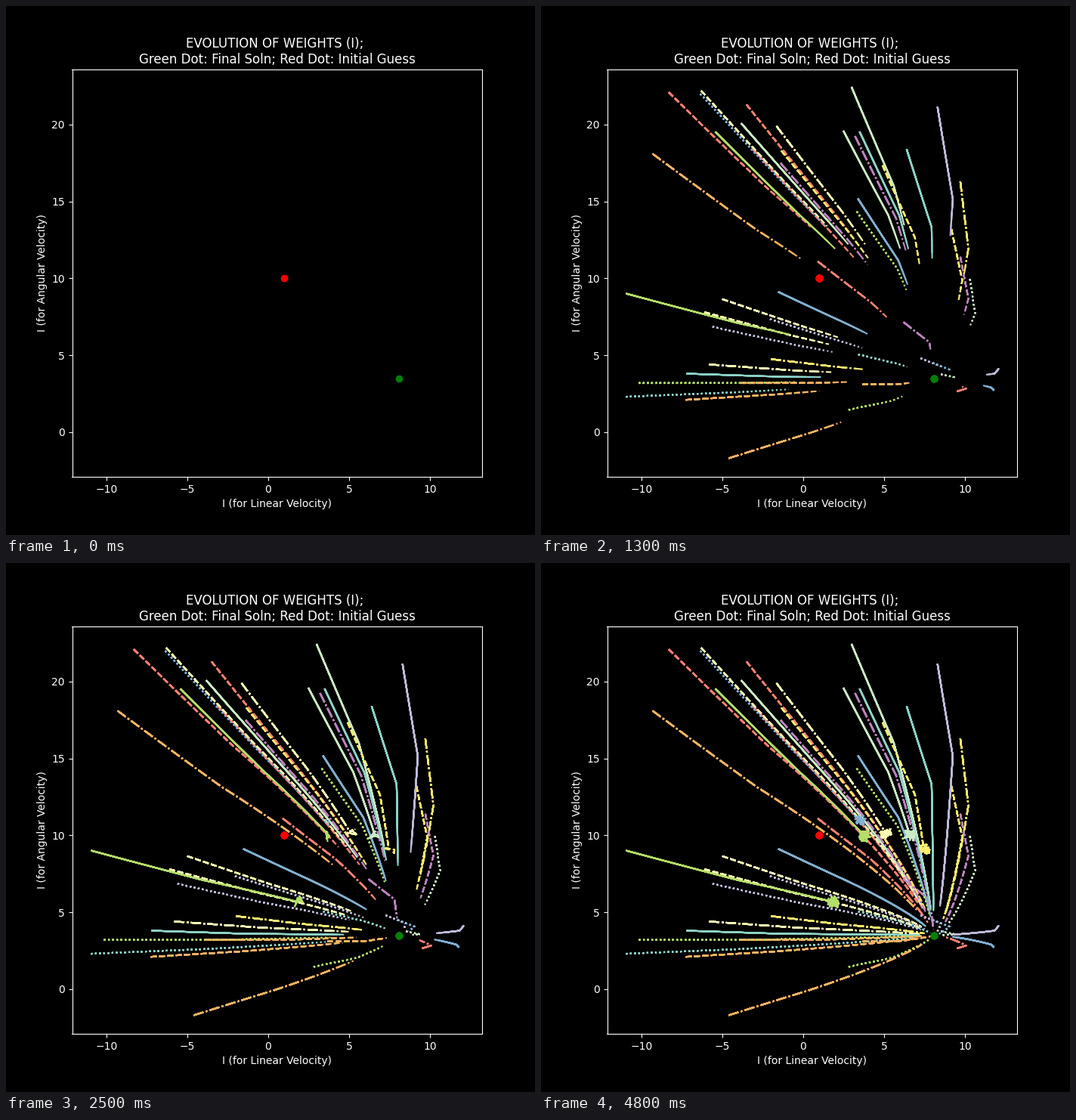
A matplotlib script that plays this animation: 700 px wide and 700 px high, repeating every 4.9 s.

```python
import numpy as np
import matplotlib.pyplot as plt
from matplotlib.animation import FuncAnimation

plt.style.use("dark_background")

FRAMES = 49
LAYERS = 12                          # each step redraws all, which hardens edges
GUESS, GOAL = (1, 10), np.array([8.05, 3.5])
LURE = np.array([11.3, 3.2])         # where the first few steps head
TURN, STALL = 8, 19                  # steps at which trails turn or get stuck
TEAL, CREAM, LILAC, RED, BLUE, ORANGE, GREEN, PURPLE, MINT, YELLOW = (
    f"C{i}" for i in range(10))

# starting weights by colour and line style
FREE = {
    (RED, "--"): [(-8.3, 22.1), (-3.5, 21.3), (-3.1, 18.4)],
    (RED, "-."): [(0.9, 11.1), (9.5, 2.65)],
    (CREAM, "--"): [(-6.3, 22.2), (-5, 8.65), (-6.1, 7.8)],
    (CREAM, "-."): [(-5.8, 4.4)],
    (MINT, "-"): [(-3.8, 20.05), (3, 22.4)],
    (MINT, ":"): [(10.3, 9.95), (8.5, 3.75)],
    (YELLOW, "--"): [(-1.35, 18.3), (9.15, 13.2)],
    (YELLOW, "-."): [(9.7, 16.3), (-2, 4.75)],
    (PURPLE, "--"): [(9.7, 11.4)],
    (PURPLE, "-."): [(-1.4, 17.5), (3.2, 19.25), (6.2, 7.15)],
    (TEAL, "-"): [(3.5, 19.5), (6.4, 18.35), (-7.15, 3.8)],
    (TEAL, ":"): [(3.4, 5.05), (-10.95, 2.3)],
    (LILAC, "-"): [(8.3, 21.1), (12.05, 4.1)],
    (LILAC, ":"): [(-2.05, 7.35), (-5.6, 6.85), (7.25, 4.8)],
    (BLUE, "-"): [(3.4, 15.15), (-1.5, 9.1), (11.75, 2.75)],
    (BLUE, ":"): [(8, 4.5)],
    (GREEN, ":"): [(3.3, 14.35), (-10.15, 3.2), (2.8, 1.45)],
    (ORANGE, "--"): [(-3.85, 3.2), (-7.25, 2.1), (3.65, 3.1)],
    (ORANGE, "-."): [(-9.3, 18.1), (-4.6, -1.7)],
}
STUCK = {
    (BLUE, ":"): [(-6.35, 22)],
    (CREAM, "-."): [(-1.65, 19.9)],
    (MINT, "-"): [(2.5, 19.55)],
    (YELLOW, "--"): [(4.9, 17.35)],
    (GREEN, "-"): [(-5.4, 19.5), (-10.9, 9)],
}


def descend(start, stuck, rng):
    """Decay towards LURE, then GOAL; x and y converge at their own rates."""
    path = [np.array(start, float)]
    for t in range(2, FRAMES):
        p = path[-1]
        if t <= TURN:
            p = p + (LURE - p) * (0.052, 0.056)
        elif stuck and t > STALL:
            p = path[STALL - 1] + rng.uniform(-0.35, 0.35, 2)
        else:
            rate = 0.058 if p[0] < GOAL[0] else 0.027
            p = p + (GOAL - p) * (rate, 0.044)
        path.append(p)
    return np.array(path)


rng = np.random.default_rng(4)
trails = [(color, style, descend(start, group is STUCK, rng))
          for group in (FREE, STUCK)
          for (color, style), starts in group.items()
          for start in starts]

fig, ax = plt.subplots(figsize=(7, 7), dpi=100)
ax.set_xlim(-12.109, 13.206)
ax.set_ylim(-2.907, 23.586)
ax.set_title("EVOLUTION OF WEIGHTS (I); \nGreen Dot: Final Soln; Red Dot: Initial Guess")
ax.set_xlabel("I (for Linear Velocity)")
ax.set_ylabel("I (for Angular Velocity)")


def make_layer():
    lines = [ax.plot([], [], color=c, ls=s)[0] for c, s, _ in trails]
    dots = [ax.plot(*pos, "o", color=c)[0]
            for pos, c in ((GUESS, "red"), (GOAL, "green"))]
    return lines, dots


layers = [make_layer() for _ in range(LAYERS)]


def update(frame):
    for lag, (lines, dots) in enumerate(reversed(layers)):
        n = max(frame - lag, 0)
        for line, (_, _, path) in zip(lines, trails):
            line.set_data(path[:n, 0], path[:n, 1])
        for dot in dots:
            dot.set_visible(frame >= lag)
    return []


anim = FuncAnimation(fig, update, frames=FRAMES, interval=100,
                     init_func=lambda: update(0), repeat=True, repeat_delay=0)
plt.show()
```
